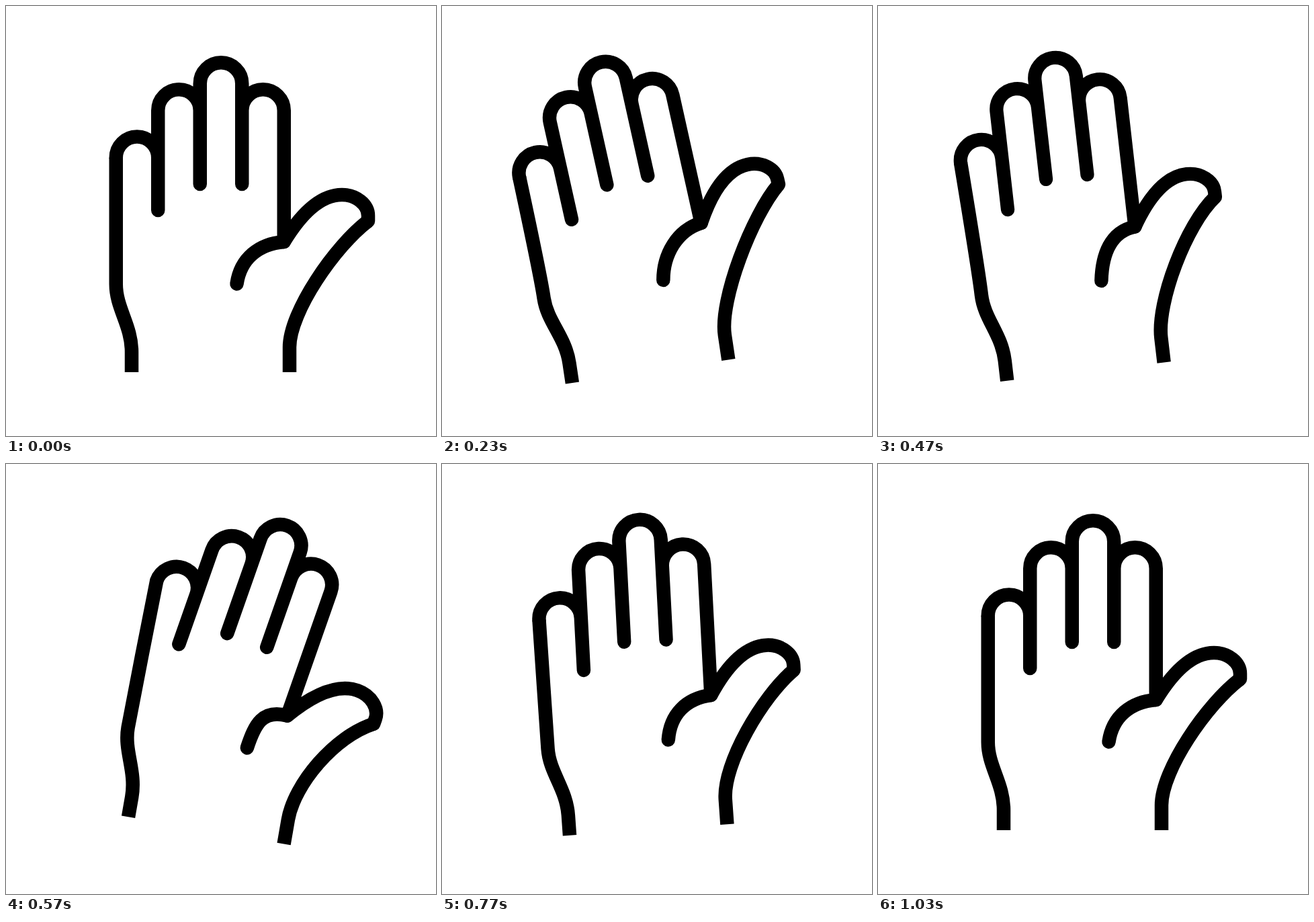
An HTML page that plays this animation: 640 px wide and 640 px high, repeating every 1.67 s.

```html
<!DOCTYPE html>
<html>
<head>
<meta charset="utf-8">
<title>Waving hand</title>
<style>
  html, body { margin: 0; height: 100%; overflow: hidden; background: #fff; }
  svg { display: block; width: 100%; height: 100%; }
  path { fill: none; stroke: #000; stroke-width: 20.5; stroke-linejoin: round; }
  .round { stroke-linecap: round; }
</style>
</head>
<body>
<svg viewBox="0 0 640 640">
  <g id="hand">
    <path id="palm"/>
    <path id="crease" class="round"/>
    <path id="fingers" class="round" d="
      M163.75 225.75a31.25 31.25 0 0 1 62.5 0V304
      V155.5a31.25 31.25 0 0 1 62.5 0V265
      V115.5a31.25 31.25 0 0 1 62.5 0V265
      V155.5a31.25 31.25 0 0 1 62.5 0V351
      C443 303 472 281 500 281C522 281 539 296 539 312V320"/>
  </g>
</svg>
<script>
const LOOP = 1670, STEP = 100 / 3;
const WRIST = [299, 506.5], KNUCKLES = [288.8, 278];

// Step, hand angle, then finger shift x, y and extra finger angle.
// The finger outline morphs in straight lines, so its cosine and sine are blended.
const poses = [
  [0, 0, 0, 0, 0],
  [3, 4.75, 0, 0, 0],
  [11, -21.67, -13, -8.2, -8.2],
  [17.2, 9.95, -5.7, -14.5, 9.5],
  [24.6, -5.8, 0, 0, 0],
  [31, 0, 0, 0, 0]
].map(([step, angle, dx, dy, bend]) => {
  const r = bend * Math.PI / 180;
  return [step, angle, dx, dy, Math.cos(r), Math.sin(r)];
});

const part = id => document.getElementById(id);
const ease = u => (1 - Math.cos(Math.PI * u)) / 2;

function poseAt(step) {
  const next = poses.findIndex(p => p[0] > step);
  if (next < 0) return poses[0];
  const a = poses[next - 1], b = poses[next];
  const k = ease((step - a[0]) / (b[0] - a[0]));
  return a.map((v, i) => v + (b[i] - v) * k);
}

function draw(step) {
  const [, angle, dx, dy, c, s] = poseAt(step);
  const [kx, ky] = KNUCKLES;
  const tx = kx + dx - kx * c + ky * s;
  const ty = ky + dy - kx * s - ky * c;
  // a point that follows the fingers, in hand coordinates
  const at = (x, y) => `${tx + x * c - y * s} ${ty + x * s + y * c} `;

  part("hand").setAttribute("transform", `rotate(${angle} ${WRIST})`);
  part("fingers").setAttribute("transform", `matrix(${[c, s, -s, c, tx, ty]})`);

  const pinky = at(163.75, 225.75);
  part("palm").setAttribute("d",
    `M187 545V515C187 475 163.75 450 163.75 414C163.75 380 ${pinky}${pinky}` +
    `M${at(539, 320)}C${at(490, 357)}422 455 422 508V545`);
  part("crease").setAttribute("d",
    `M343.5 413.5C349 376 ${at(376, 354)}${at(413.75, 351)}`);
}

const start = performance.now();
function tick() {
  const t = (performance.now() - start) % LOOP;
  draw(Math.floor((t + 4) / STEP));
  requestAnimationFrame(tick);
}
tick();
</script>
</body>
</html>
```
